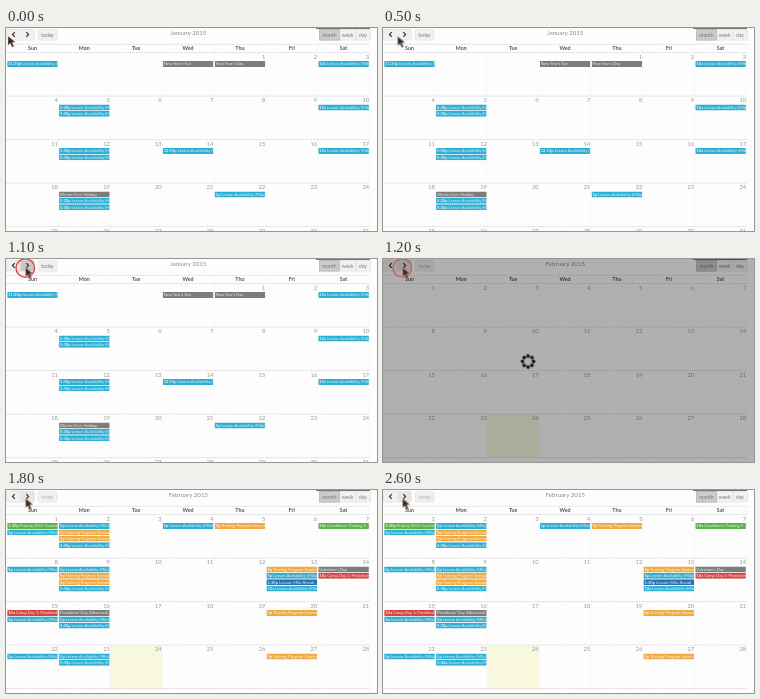
Recreate the animation shown at these times as an HTML page. Size 371 px wide and 203 px high, loop 2.7 s.

```html
<!DOCTYPE html>
<html lang="en">
<head>
<meta charset="utf-8">
<title>Calendar</title>
<style>
html, body { margin: 0; width: 100%; height: 100%; overflow: hidden; background: #fdfdfd; }
svg { display: block; }
#stage { width: 371px; height: 203px; font-family: Lato, sans-serif; }
.line { stroke: #d6d6d6; stroke-width: .7; stroke-dasharray: 3 .7; }
.column { stroke: #f6f6f6; stroke-width: .7; }
.weekday { font-size: 5.3px; font-weight: 700; fill: #555; text-anchor: middle; }
.date { font-size: 5.6px; fill: #959595; text-anchor: end; }
.title { font-size: 6.1px; fill: #8a8a8a; text-anchor: middle; }
.event { font-size: 4.1px; fill: #fff; fill-opacity: .85; }
.event tspan { font-weight: 700; }
.label { font-size: 5px; fill: #777; text-anchor: middle; }
.button { fill: #f1f1f1; stroke: #d8d8d8; stroke-width: .6; }
.chevron { fill: none; stroke: #333; stroke-width: 1.2; }

.january, .february, .events, .shade, .press, .click, .pointer { animation: 2.7s step-end infinite; }
.january { animation-name: january; }
.february { animation-name: february; }
.events { animation-name: events; }
.shade { animation-name: shade; }
.press { animation-name: press; }
.click { animation-name: click; transform-origin: 19.3px 9px; }
.pointer { animation-name: pointer; }
.spinner { animation: spin 2.7s steps(27) infinite; transform-origin: 145px 102.5px; }

@keyframes january { 0% { opacity: 1; } 44.44%, 100% { opacity: 0; } }
@keyframes february { 0% { opacity: 0; } 44.44%, 100% { opacity: 1; } }
@keyframes events { 0% { opacity: 0; } 66.66%, 100% { opacity: 1; } }
@keyframes shade { 0% { opacity: 0; } 44.44% { opacity: 1; } 66.66%, 100% { opacity: 0; } }
@keyframes press { 0% { opacity: 0; } 25.92% { opacity: .3; } 33.33% { opacity: 1; } 44.44%, 100% { opacity: .3; } }
@keyframes click {
  0% { opacity: 0; transform: scale(.4); }
  33.33% { opacity: 1; transform: scale(.45); }
  37.03% { opacity: 1; transform: scale(.75); }
  40.74% { opacity: 1; transform: scale(1); }
  44.44% { opacity: .75; transform: scale(1); }
  48.14% { opacity: .4; transform: scale(1); }
  51.85%, 100% { opacity: 0; transform: scale(1); }
}
@keyframes pointer {
  0% { transform: translate(2px, 8px); animation-timing-function: steps(7); }
  25.92%, 100% { transform: translate(19.6px, 8.5px); }
}
@keyframes spin { from { transform: rotate(9deg); } to { transform: rotate(495deg); } }
</style>
</head>
<body>
<svg id="stage" viewBox="0 0 371 203">
  <rect width="371" height="203" fill="#fdfdfd"/>
  <rect class="february" x="104.3" y="155.2" width="52" height="43.3" fill="#f8f8df"/>
  <g id="grid"></g>
  <g class="january" id="january"></g>
  <g class="february">
    <g id="february"></g>
    <g class="events" id="februaryEvents"></g>
  </g>

  <rect class="button" x=".5" y="1.3" width="27.8" height="10.8" rx="1.5"/>
  <rect class="press" x="14.4" y="1.6" width="13.6" height="10.2" fill="#cfcfcf"/>
  <path class="chevron" d="M8.8 4.2 6.5 6.5l2.3 2.3M20.3 4.2l2.3 2.3-2.3 2.3"/>
  <rect class="button" x="32.3" y="1.8" width="18.5" height="10.3" rx="1.5"/>
  <text class="label january" x="41.5" y="8.7">today</text>
  <text class="label february" x="41.5" y="8.7" fill-opacity=".55">today</text>
  <rect class="button" x="313.5" y="1.3" width="51" height="10.8" rx="1.5"/>
  <rect x="313.5" y="1.3" width="20" height="10.8" fill="#cbcbcb" stroke="#aaa" stroke-width=".6"/>
  <path d="M349.8 1.5v10.4" stroke="#d4d4d4" stroke-width=".6"/>
  <path d="M310 .5h54" stroke="#777"/>
  <text class="label" x="323.5" y="8.6">month</text>
  <text class="label" x="341.7" y="8.6">week</text>
  <text class="label" x="357" y="8.6">day</text>

  <g class="shade">
    <rect width="371" height="203" fill="#000" fill-opacity=".3"/>
    <g class="spinner" id="spinner" fill="#1e1719"></g>
  </g>
  <circle class="click" cx="19.3" cy="9" r="9.3" fill="#e04848" fill-opacity=".08" stroke="#d84a4a" stroke-width="1.4"/>
  <path class="pointer" d="M0 0v9.3l2.3-2 1.9 3.9 1.8-.9-1.9-3.7 3.2-.3z" fill="#3f2818" stroke="#d8cfc8" stroke-width=".4"/>
</svg>

<script>
const COLUMN = 51.85, ROW = 43.5, TOP = 24.6;
const byId = id => document.getElementById(id);

function add(parent, tag, attrs, text = '') {
  const node = document.createElementNS('http://www.w3.org/2000/svg', tag);
  for (const key in attrs) node.setAttribute(key, attrs[key]);
  node.textContent = text;
  return parent.appendChild(node);
}

function drawGrid(grid) {
  for (let i = 1; i < 8; i++) {
    const x = .5 + i * COLUMN;
    add(grid, 'line', { class: 'column', x1: x, x2: x, y1: 16, y2: 203 });
  }
  [16.3, ...[0, 1, 2, 3, 4].map(row => TOP + row * ROW)].forEach(y =>
    add(grid, 'line', { class: 'line', x1: 0, x2: 364, y1: y, y2: y }));
  ['Sun', 'Mon', 'Tue', 'Wed', 'Thu', 'Fri', 'Sat'].forEach((name, i) =>
    add(grid, 'text', { class: 'weekday', x: 26.5 + i * COLUMN, y: 22.4 }, name));
}

function drawMonth(parent, title, firstColumn, days) {
  add(parent, 'text', { class: 'title', x: 182.3, y: 6.8 }, title);
  for (let day = 1; day <= days; day++) {
    const cell = day - 1 + firstColumn;
    add(parent, 'text', {
      class: 'date',
      x: 51.8 + (cell % 7) * COLUMN,
      y: TOP + Math.floor(cell / 7) * ROW + 6.2
    }, day);
  }
}

const kinds = {
  lesson: ['#2eaed2', 'Lesson Availability (Milo)'],
  training: ['#f0aa42', 'Training Program Session'],
  private: ['#2b6fae', 'Lesson: Milo Brandt'],
  coaches: ['#5bb349', 'Priority 2015 Coaches'],
  conditions: ['#5bb349', 'Conditions: Training S'],
  comp: ['#d84643', 'Comp Day 1: Presidents'],
  newEve: ['#7c7c7c', "New Year's Eve"],
  newDay: ['#7c7c7c', "New Year's Day"],
  civic: ['#7c7c7c', 'Winter Civic Holiday'],
  valentine: ['#7c7c7c', "Valentine's Day"],
  presidents: ['#7c7c7c', "Presidents' Day (Observed)"]
};

// Each entry is "kind" or "kind@time", stacked from the top of the cell.
function drawEvents(parent, row, column, entries) {
  entries.split(' ').forEach((entry, i) => {
    const [kind, time] = entry.split('@');
    const [color, name] = kinds[kind];
    const box = add(parent, 'svg', {
      x: 1.2 + column * COLUMN, y: TOP + row * ROW + 8.5 + i * 6.35,
      width: 50.6, height: 5.8
    });
    add(box, 'rect', { width: 50.6, height: 5.8, rx: .7, fill: color });
    const label = add(box, 'text', { class: 'event', x: 1, y: 4.4 });
    if (time) add(label, 'tspan', {}, time);
    label.append((time ? ' ' : '') + name);
  });
}

drawGrid(byId('grid'));
drawMonth(byId('january'), 'January 2015', 4, 31);
drawMonth(byId('february'), 'February 2015', 0, 28);

const evenings = 'lesson@5:30p lesson@5:30p';
[
  [0, 0, 'lesson@11:30p'], [0, 3, 'newEve'], [0, 4, 'newDay'], [0, 6, 'lesson@10a'],
  [1, 1, evenings], [1, 6, 'lesson@10a'],
  [2, 1, evenings], [2, 3, 'lesson@12:15p'], [2, 6, 'lesson@10a'],
  [3, 1, 'civic ' + evenings], [3, 4, 'lesson@5p']
].forEach(cell => drawEvents(byId('january'), ...cell));

const mondays = 'lesson@5p training@9p training@9p lesson@5:30p';
[
  [0, 0, 'coaches@1:30p lesson@5p'], [0, 1, mondays], [0, 3, 'lesson@5p'],
  [0, 4, 'training@9p'], [0, 6, 'conditions@10a'],
  [1, 0, 'lesson@5p'], [1, 1, mondays],
  [1, 5, 'training@9p lesson@5p private@1:30p lesson@10a'], [1, 6, 'valentine comp@10a'],
  [2, 0, 'comp@10a lesson@5p'], [2, 1, 'presidents lesson@5p lesson@5:30p'], [2, 5, 'training@9p'],
  [3, 0, 'lesson@5p'], [3, 1, 'lesson@5p lesson@5:30p'], [3, 5, 'training@9p']
].forEach(cell => drawEvents(byId('februaryEvents'), ...cell));

for (let i = 0; i < 8; i++) {
  const angle = i * Math.PI / 4;
  add(byId('spinner'), 'circle', {
    cx: 145 + 5.5 * Math.cos(angle), cy: 102.5 + 5.5 * Math.sin(angle), r: 1.85
  });
}
</script>
</body>
</html>
```
